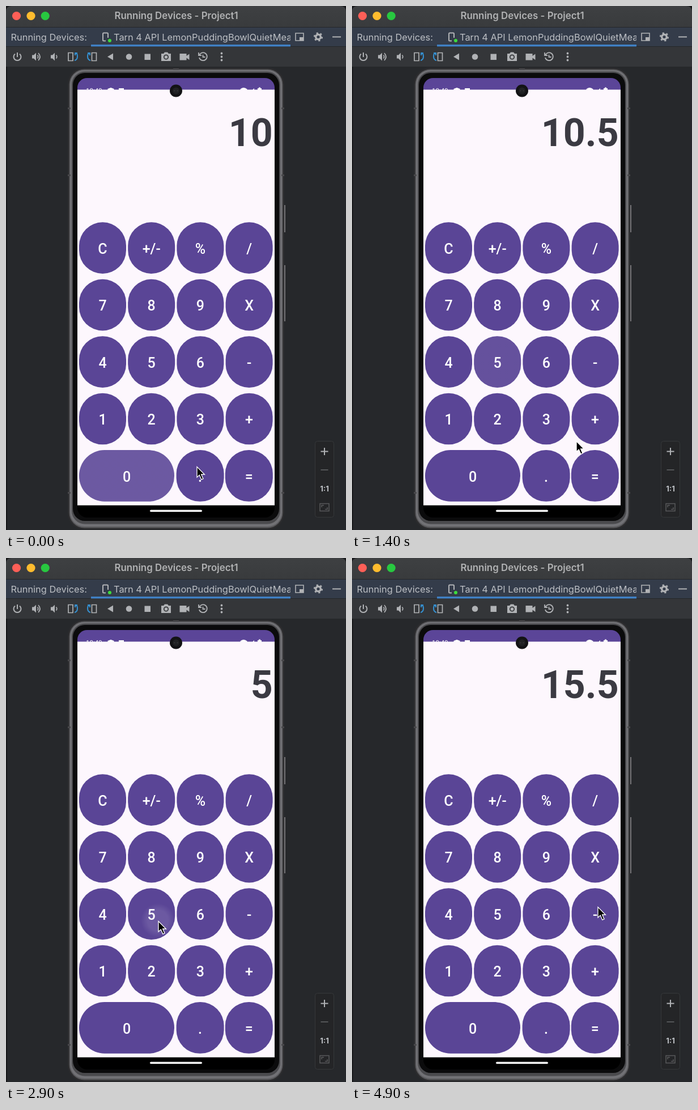
Animation, 600 px wide and 924 px high, one loop 5 s. Source, as an HTML page:

```html
<!DOCTYPE html>
<html lang="en">
<head>
<meta charset="utf-8">
<title>Calculator</title>
<style>
html, body { margin: 0; height: 100%; overflow: hidden; background: #26282b; }
svg { display: block; width: 100vw; height: 100vh; }
.ui { font: 16.4px Inter, sans-serif; fill: #bcbfc4; }
.title { font-weight: 600; font-size: 16.9px; fill: #b1b2b3; }
.key { font: 500 25px Roboto, sans-serif; fill: #fff; text-anchor: middle; }
.total { font: 700 68px Roboto, sans-serif; fill: #3b3a42; text-anchor: end; }
.line { fill: none; stroke: #b0b2b5; stroke-width: 2; }
.solid { fill: #b0b2b5; }
.blue { fill: none; stroke: #3592d4; stroke-width: 2; }
</style>
</head>
<body>
<svg viewBox="0 0 600 924" preserveAspectRatio="none">
  <defs>
    <radialGradient id="glow" gradientUnits="userSpaceOnUse">
      <stop offset=".6" stop-color="#fff"/>
      <stop offset="1" stop-color="#fff" stop-opacity="0"/>
    </radialGradient>
    <linearGradient id="bar" x2="0" y2="1">
      <stop stop-color="#3e4042"/><stop offset="1" stop-color="#393b3d"/>
    </linearGradient>
    <clipPath id="screen"><rect x="126" y="127" width="348" height="775" rx="17"/></clipPath>
    <clipPath id="tab"><rect x="150" y="38" width="352" height="34"/></clipPath>
    <path id="speaker" d="M-6-3h3l4-4V7L-3 3h-3z"/>
  </defs>

  <!-- window -->
  <rect width="600" height="924" fill="#26282b"/>
  <rect width="600" height="37" fill="url(#bar)"/>
  <rect y="37" width="600" height="34" fill="#343c4a"/>
  <rect y="71" width="600" height="36" fill="#343639"/>
  <path d="M0 37.5H600M0 71.5H600M0 107.5H600" stroke="#252729"/>
  <path d="M1 107V924" stroke="#17181a" stroke-width="2"/>
  <path d="M0 0H10Q0 0 0 10ZM600 0H590Q600 0 600 10Z" fill="#17181a"/>
  <circle cx="18.5" cy="17.5" r="7.6" fill="#fe5f57"/>
  <circle cx="44" cy="17.5" r="7.6" fill="#febc2e"/>
  <circle cx="69.2" cy="17.5" r="7.6" fill="#28c840"/>
  <text class="ui title" x="300.5" y="23" text-anchor="middle">Running Devices - Project1</text>
  <text class="ui" x="8.5" y="61">Running Devices:</text>
  <text class="ui" x="190" y="61" clip-path="url(#tab)">Tarn 4 API LemonPuddingBowlQuietMeadowLane</text>
  <rect x="150" y="68" width="352" height="3.5" fill="#4080c4"/>
  <rect x="171" y="47.5" width="9" height="14" rx="1.5" class="line"/>
  <path d="M176 56h10v7h-10z" fill="#343c4a"/>
  <circle cx="183" cy="61" r="3" fill="#3ddc3d"/>
  <path d="M511 48h14v13h-14z" class="line" style="stroke-width:1.6"/>
  <path d="M518 55h7v6h-7z" class="solid"/>
  <circle cx="551" cy="54.5" r="4.3" class="line" style="stroke-width:3.4"/>
  <circle cx="551" cy="54.5" r="6.8" class="line" style="stroke-dasharray:3.1 4.02;stroke-width:2.6"/>
  <path d="M576 54.5h15" class="line"/>

  <!-- toolbar -->
  <path d="M16 84.5a6.5 6.5 0 1 0 8 0M20 82v8" class="line"/>
  <use href="#speaker" x="52" y="89.5" class="solid"/>
  <path d="M55.5 86.5q2.5 3 0 6M57 83q6 6.5 0 13" class="line" style="stroke-width:1.7"/>
  <use href="#speaker" x="85" y="89.5" class="solid"/>
  <path d="M88.5 86.5q2.5 3 0 6" class="line" style="stroke-width:1.7"/>
  <path d="M110 82.5h8v14h-8z" class="line" style="stroke-width:1.7"/>
  <path d="M121 96q5-1 5-7t-4-6m0 4v-4h4" class="blue"/>
  <path d="M151.5 82.5h8v14h-8z" class="line" style="stroke-width:1.7"/>
  <path d="M149 96q-5-1-5-7t4-6m0 4v-4h-4" class="blue"/>
  <path d="M179 89.5l10-6v12z" class="solid"/>
  <circle cx="217" cy="89.5" r="5.3" class="solid"/>
  <path d="M244.5 84.5h10.5v10.5h-10.5z" class="solid"/>
  <path d="M274 84h4l2-2.5h5l2 2.5h4v13h-17z" class="solid"/>
  <circle cx="282.5" cy="90" r="3.7" fill="#b0b2b5" stroke="#343639" stroke-width="1.7"/>
  <path d="M306.5 84h12v4l5-3.5v10.5l-5-3.5v4h-12z" class="solid"/>
  <path d="M341.5 86a7 7 0 1 1-.5 5M340 82v5h5M347.5 86v4h4" class="line" style="stroke-width:1.8"/>
  <path d="M380.5 83.5v.01m0 6v.01m0 6v.01" class="line" style="stroke-width:3.8;stroke-linecap:round"/>

  <!-- phone -->
  <path d="M491.5 351v48M491.5 457v99" stroke="#737376" stroke-width="3"/>
  <path d="M490.5 351v48M490.5 457v99" stroke="#2b2b2d"/>
  <rect x="109" y="109" width="382" height="814" rx="29" fill="#2c2c2e"/>
  <rect x="111.5" y="111.5" width="377" height="809" rx="27" fill="#58585b"/>
  <rect x="113" y="113" width="374" height="805" rx="25" fill="#717175"/>
  <rect x="116" y="115.5" width="368" height="798" rx="23" fill="#4a4a4d"/>
  <rect x="118" y="118" width="364" height="790" rx="21" fill="#0b0b0c"/>
  <path d="M109 180.5h5M109 298.5h5M109 858.5h5M486 180.5h5M486 298.5h5M486 858.5h5M295 111.5h10" stroke="#48484b" stroke-width="3"/>
  <g clip-path="url(#screen)">
    <path d="M126 127h348v21H126z" fill="#5b4598"/>
    <g fill="#fff">
      <text x="141" y="153" style="font:11.5px Roboto,sans-serif">10:49</text>
      <path d="M179.5 146l5.5-2 5.5 2v7h-11zM199 145h9v5h-9zM413 147q6-6 13 0l-6 6zM430 153l8-8v8zM444 145h2v-1.5h3v1.5h2v9h-7z"/>
    </g>
    <path d="M126 147.5h348V881H126z" fill="#fdf7fd"/>
    <path d="M126 880.5h348V902H126z" fill="#000"/>
  </g>
  <rect x="254" y="888.5" width="92" height="3.6" rx="1.8" fill="#f4f4f4"/>
  <circle cx="300" cy="149.5" r="11" fill="#131315"/>
  <circle cx="300" cy="149.5" r="6" fill="#202123"/>
  <path d="M296.5 149.5h2M301.5 149.5h2" stroke="#3a3b3e" stroke-width="1.5"/>

  <!-- zoom panel -->
  <rect x="545.5" y="767.5" width="33" height="134" rx="4" fill="#242527" stroke="#36383a"/>
  <path d="M555.5 785.5h13M562 779v13" class="line"/>
  <path d="M555.5 818h13" class="line" style="stroke:#545658"/>
  <text class="ui" x="562" y="856" text-anchor="middle" style="font-size:13px;font-weight:700">1:1</text>
  <path d="M554 877.5h16v13h-16z" class="line" style="stroke:#58595b;stroke-width:1.5"/>
  <path d="M557 884v-3.5h4M567 884v3.5h-4" class="line" style="stroke:#58595b;stroke-width:1.5"/>

  <text id="total" class="total" x="470.7" y="246.5"></text>
  <g id="shapes" fill="#5a4596"></g>
  <rect id="ripple" fill="url(#glow)"/>
  <g id="labels" class="key"></g>
  <g id="ring" fill="none">
    <circle r="27.6" stroke="#111" stroke-width="1.8"/>
    <circle r="26" stroke="#fff" stroke-width="1.4"/>
  </g>
  <path id="cursor" d="M0 0V18.5L4.3 14.6L7.8 22.6L11 21.2L7.6 13.5H13.4Z" fill="#000" stroke="#fff" stroke-width="1.3"/>
</svg>
<script>
const $ = id => document.getElementById(id);
const set = (el, attrs) => { for (const k in attrs) el.setAttribute(k, attrs[k]); return el; };
const add = (parent, tag, attrs) =>
  parent.appendChild(set(document.createElementNS('http://www.w3.org/2000/svg', tag), attrs));

const keys = {};
['C +/- % /', '7 8 9 X', '4 5 6 -', '1 2 3 +', '0  . ='].forEach((row, r) =>
  row.split(' ').forEach((label, c) => {
    if (!label) return;
    const wide = label === '0', last = r === 4 && !wide;
    const radius = wide ? 45 : 41.5;
    const box = { x: 129 + 86.2 * c - (last ? 0.8 : 0), y: 381.3 + 100.45 * r,
                  width: wide ? 168 : last ? 84 : 83, height: 90.7, rx: radius, ry: radius };
    add($('shapes'), 'rect', box);
    add($('labels'), 'text', { x: box.x + box.width / 2, y: box.y + 55.5 }).textContent = label;
    keys[label] = box;
  }));

// time the app reacts, key, touch point, number shown
const presses = [
  [-300, '0', 215, 830, '10'],
  [300, '.', 336, 811, '10.'],
  [900, '5', 257, 636, '10.5'],
  [1900, '+', 436, 748, '10.5'],
  [2800, '5', 268, 639, '5'],
  [3700, '=', 432, 806, '15.5']
];
// time, x, y of the pointer
const path = [
  [0, 336, 811], [250, 336, 811], [600, 257, 636], [1000, 257, 636],
  [1400, 395, 766], [1650, 436, 748], [2150, 436, 748], [2550, 268, 639],
  [2950, 268, 639], [3350, 432, 806], [4000, 432, 806], [4600, 433, 614], [5000, 433, 614]
];

function pointer(t) {
  const i = path.findIndex(p => p[0] > t);
  const [t0, x0, y0] = path[i - 1], [t1, x1, y1] = path[i];
  const u = (t - t0) / (t1 - t0), e = u * u * (3 - 2 * u);
  return `translate(${x0 + (x1 - x0) * e + 1} ${y0 + (y1 - y0) * e + 1.5})`;
}

function draw(now) {
  const t = Math.floor(now % 5000 / 100) * 100;
  const [start, key, cx, cy, total] = presses.findLast(p => p[0] <= t);
  const age = t - start;
  $('total').textContent = total;
  set($('ripple'), { ...keys[key], opacity: 0.11 * Math.min(1, Math.max(0, (800 - age) / 500)) });
  set($('glow'), { cx, cy, r: 30 * (age / 100) ** 1.8 });

  const touch = presses.find(p => t >= p[0] - 200 && t < p[0]);
  set($('ring'), touch
    ? { visibility: 'visible', transform: `translate(${touch[2] + 0.5} ${touch[3] + 2.5})` }
    : { visibility: 'hidden' });
  set($('cursor'), { transform: pointer(t) });
}

const begin = performance.now();
function tick() {
  draw(performance.now() - begin);
  requestAnimationFrame(tick);
}
tick();
</script>
</body>
</html>
```
